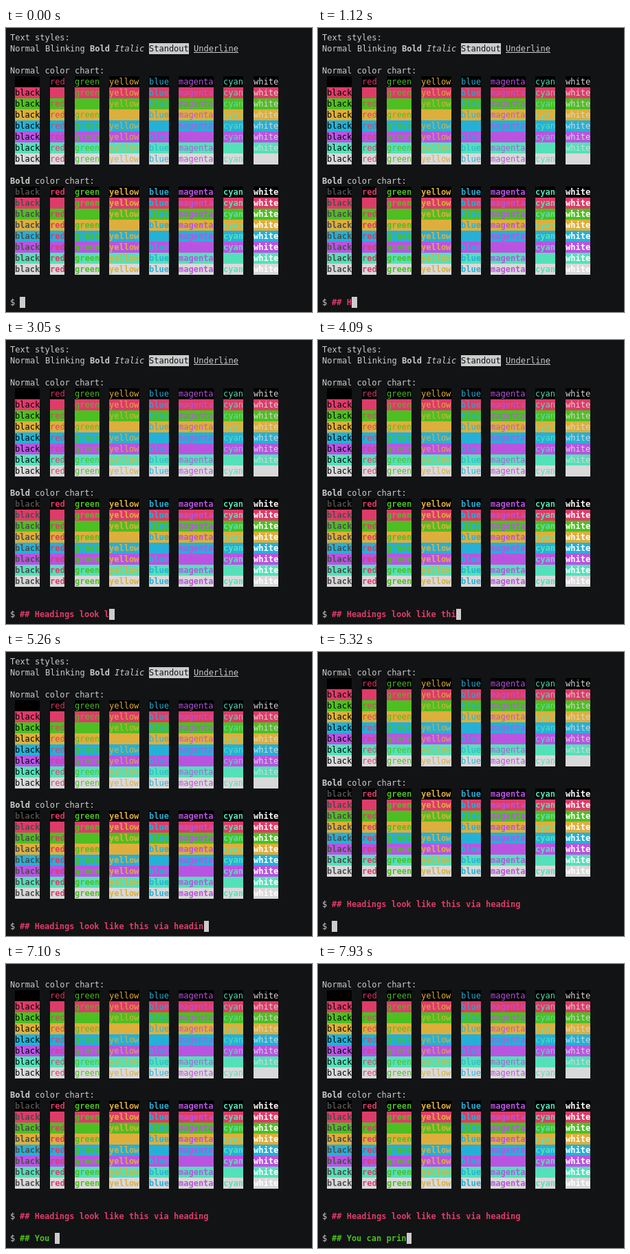
Recreate the animation shown at these times as an HTML page. Size 445 by 412 pixels, loop 7.99 s.

```html
<!DOCTYPE html>
<html lang="en">
<head>
<meta charset="utf-8">
<title>Terminal styles</title>
<style>
  html, body { margin: 0; width: 100%; height: 100%; overflow: hidden; background: #121314; }
  #screen { position: absolute; left: 6px; top: 6px; width: 439px; height: 400px; overflow: hidden; }
  #screen div { position: absolute; left: 0; top: 0; }
  span { position: absolute; height: 16px; white-space: pre; color: #ccc;
         font: 12px/16px "DejaVu Sans Mono", monospace; }
</style>
</head>
<body>
<div id="screen"><div id="chart"></div><div id="prompt"></div></div>
<script>
const LOOP = 7990, SCROLL_AT = 5320;
const CELL = 7.21875, ROW = 16, PROMPT_ROW = 24;
const COLORS = {
  black: '#000', red: '#dd3c69', green: '#4ebf22', yellow: '#ddaf3c',
  blue: '#26b0d7', magenta: '#b954e1', cyan: '#54e1b9', white: '#d9d9d9'
};
const BRIGHT = { black: '#4d4d4d', white: '#fff' };
const BOLD = 'font-weight:bold;';
const INVERSE = 'background:#ccc;color:#121314;';

// Typing pace: [time in ms, characters typed]
const HEADING = {
  text: '## Headings look like this via heading', color: COLORS.red,
  pace: [[1000, 1], [1120, 4], [2210, 11], [3050, 18], [3770, 23], [4090, 25], [4670, 34], [5260, 37]]
};
const PRINTING = {
  text: '## You can prin', color: COLORS.green,
  pace: [[6320, 1], [6580, 4], [7100, 7], [7930, 15]]
};

const chart = document.getElementById('chart');
const prompt = document.getElementById('prompt');

// Each run of text starts and ends on a whole pixel.
function run(row, col, text, style = '') {
  const left = Math.round(col * CELL);
  const width = Math.round((col + text.length) * CELL) - left;
  return `<span style="left:${left}px;top:${row * ROW}px;width:${width}px;${style}">${text}</span>`;
}

function colorChart(firstRow, bold) {
  let html = '';
  Object.values(COLORS).forEach((back, i) => {
    let col = 1;
    for (const name in COLORS) {
      const color = bold && BRIGHT[name] || COLORS[name];
      html += run(firstRow + i, col, name, `background:${back};color:${color};${bold ? BOLD : ''}`);
      col += name.length + 2;
    }
  });
  return html;
}

function promptLine(row, { text, color }, count = text.length) {
  return run(row, 0, '$') + run(row, 2, text.slice(0, count), `color:${color};${BOLD}`);
}

function typedCount(pace, t) {
  if (t < pace[0][0]) return 0;
  const next = pace.findIndex(([time]) => time > t);
  if (next < 0) return pace[pace.length - 1][1];
  const [t0, n0] = pace[next - 1], [t1, n1] = pace[next];
  return Math.floor(n0 + (n1 - n0) * (t - t0) / (t1 - t0));
}

chart.innerHTML =
  run(0, 0, 'Text styles:') +
  run(1, 0, 'Normal') + run(1, 7, 'Blinking') + run(1, 16, 'Bold', BOLD) +
  run(1, 21, 'Italic', 'font-style:italic') + run(1, 28, 'Standout', INVERSE) +
  run(1, 37, 'Underline', 'text-decoration:underline') +
  run(3, 0, 'Normal color chart:') + colorChart(4, false) +
  run(13, 0, 'Bold', BOLD) + run(13, 5, 'color chart:') + colorChart(14, true);

function draw() {
  const t = performance.now() % LOOP;
  const scrolled = t >= SCROLL_AT;
  const line = scrolled ? PRINTING : HEADING;
  const count = typedCount(line.pace, t);

  const html = (scrolled ? promptLine(PROMPT_ROW - 2, HEADING) : '') +
    promptLine(PROMPT_ROW, line, count) + run(PROMPT_ROW, 2 + count, ' ', INVERSE);
  if (draw.last !== html) prompt.innerHTML = draw.last = html;
  chart.style.top = scrolled ? `${-2 * ROW}px` : 0;
  requestAnimationFrame(draw);
}
draw();
</script>
</body>
</html>
```
